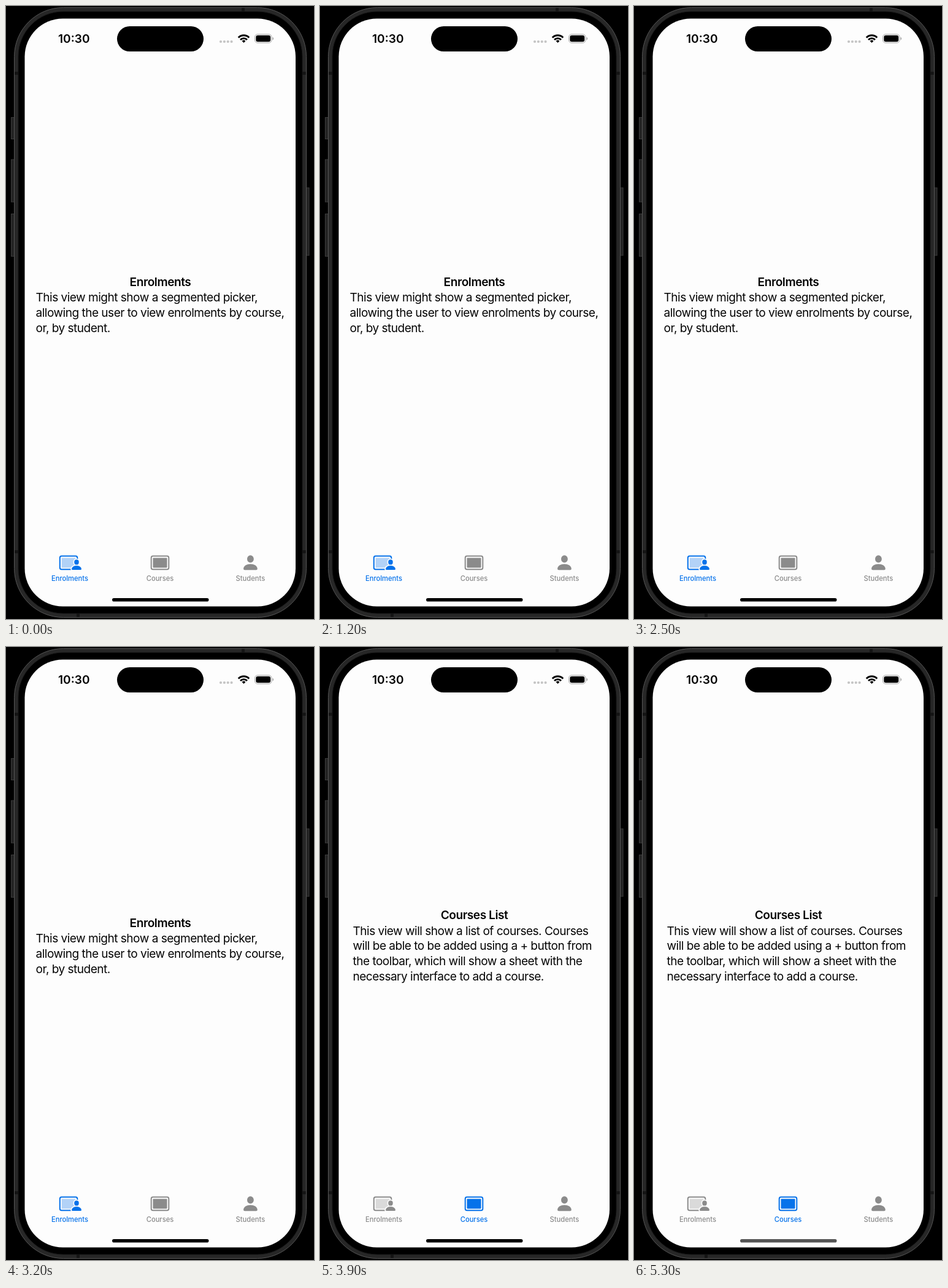
Write an HTML page that moves like this. It is 502 by 998 pixels and loops after 8 s.

```html
<!DOCTYPE html>
<html lang="en">
<head>
<meta charset="utf-8">
<title>Tab bar</title>
<style>
  html, body { margin: 0; width: 100%; height: 100%; overflow: hidden; background: #000; }
  svg { display: block; width: 100%; height: 100%; }
  text { font-family: Inter, sans-serif; }
  .title, .copy { font-size: 19.1px; fill: #050505; letter-spacing: -.53px; }
  .title { font-weight: 600; text-anchor: middle; letter-spacing: -.45px; }
  .clock { font-size: 19.1px; font-weight: 600; }
  .tab { color: #8b8b8b; }
  .tab.on { color: #0672ea; }
  .tab text { font-size: 11.2px; font-weight: 500; text-anchor: middle; fill: currentColor; }
  .fill { fill: currentColor; }
  .line { fill: none; stroke: currentColor; stroke-width: 2; }
</style>
</head>
<body>
<svg viewBox="0 0 502 998">
  <!-- Phone body -->
  <g fill="#232323" stroke="#3b3b3b">
    <rect x="8.5" y="181.500" width="6" height="35"/>
    <rect x="8.5" y="250" width="6" height="69"/>
    <rect x="8.5" y="338.500" width="6" height="69"/>
    <rect x="488" y="296" width="6" height="110"/>
  </g>
  <rect x="13.500" y="2.500" width="476" height="993" rx="80" fill="#272727" stroke="#555"/>
  <path d="M14 109.500h6M14 888.500h6M483 109.500h6M483 888.500h6M386.500 3v6M117.500 989v6" stroke="#151515" stroke-width="5"/>
  <rect x="20" y="9" width="463" height="980" rx="73" fill="#000" stroke="#171717"/>
  <rect x="30.500" y="20.500" width="441.500" height="957" rx="62" fill="#fdfdfd"/>

  <!-- Status bar -->
  <text class="clock" x="85" y="60">10:30</text>
  <rect x="181" y="33" width="141" height="41" rx="20.500"/>
  <path d="M350 58h.01m5.850 0h.01m5.850 0h.01m5.850 0h.01" stroke="#c4c4c4" stroke-width="4.200" stroke-linecap="round"/>
  <g fill="none" stroke="#000" stroke-width="2.900">
    <path d="M378.800 51.400a12.300 12.300 0 0 1 17.400 0M382 54.900a7.700 7.700 0 0 1 11 0"/>
    <path d="M387.500 60l-2.900-3a4.100 4.100 0 0 1 5.800 0z" fill="#000" stroke="none"/>
  </g>
  <rect x="405.500" y="46" width="27.500" height="14" rx="4.600" fill="none" stroke="#a5a5a5"/>
  <rect x="407.300" y="47.800" width="23.900" height="10.400" rx="3"/>
  <path d="M434.500 50.800a2.400 2.400 0 0 1 0 4.600z" fill="#a5a5a5"/>

  <!-- Pages -->
  <g class="page">
    <text class="title" x="251.500" y="455.700">Enrolments</text>
    <text class="copy">
      <tspan x="48.500" y="481">This view might show a segmented picker,</tspan>
      <tspan x="48.500" y="505.700">allowing the user to view enrolments by course,</tspan>
      <tspan x="48.500" y="530.500">or, by student.</tspan>
    </text>
  </g>
  <g class="page">
    <text class="title" x="251.500" y="443.300">Courses List</text>
    <text class="copy">
      <tspan x="53.500" y="468.500">This view will show a list of courses. Courses</tspan>
      <tspan x="53.500" y="493.300">will be able to be added using a + button from</tspan>
      <tspan x="53.500" y="518">the toolbar, which will show a sheet with the</tspan>
      <tspan x="53.500" y="542.800">necessary interface to add a course.</tspan>
    </text>
  </g>

  <!-- Tab bar -->
  <defs>
    <g id="person">
      <ellipse cy="-7.300" rx="5.400" ry="6"/>
      <path d="M-11.300 8.800C-11.300 4-6 1.100 0 1.100S11.300 4 11.300 8.800Q11.300 10.700 9.300 10.700H-9.300Q-11.300 10.700-11.300 8.800z"/>
    </g>
  </defs>
  <g class="tab">
    <rect class="line" x="87.800" y="895.600" width="28.500" height="21.600" rx="2.800"/>
    <rect class="fill" x="90.600" y="898.400" width="23" height="16" rx=".8" opacity=".3"/>
    <use href="#person" transform="translate(115 910.500) scale(.7)" fill="#fdfdfd" stroke="#fdfdfd" stroke-width="5"/>
    <use href="#person" transform="translate(115 910.500) scale(.7)" class="fill"/>
    <text x="104" y="936">Enrolments</text>
  </g>
  <g class="tab">
    <rect class="line" x="236.700" y="895.600" width="28.600" height="21.600" rx="2.800"/>
    <rect class="fill" x="239.500" y="898.400" width="23" height="16" rx=".8"/>
    <text x="251" y="936">Courses</text>
  </g>
  <g class="tab">
    <use href="#person" transform="translate(398.400 907.500)" class="fill"/>
    <text x="398.400" y="936">Students</text>
  </g>
  <rect id="home" x="173" y="964" width="157.500" height="5.600" rx="2.800"/>
  <circle id="touch" cx="247.800" cy="914" r="18.500" fill="#bababa"/>
</svg>
<script>
  const LOOP = 8000, PRESS = 3400, SWITCH = 3900;
  const pages = document.querySelectorAll('.page');
  const tabs = document.querySelectorAll('.tab');
  const home = document.getElementById('home');
  const touch = document.getElementById('touch');
  const ramp = (t, start, length) => Math.min(1, Math.max(0, (t - start) / length));

  function draw(now) {
    const t = now % LOOP;
    const selected = t < SWITCH ? 0 : 1;
    pages.forEach((page, i) => page.style.display = i === selected ? '' : 'none');
    tabs.forEach((tab, i) => tab.classList.toggle('on', i === selected));
    const grey = Math.round(85 * ramp(t, SWITCH, 400));
    home.setAttribute('fill', `rgb(${grey},${grey},${grey})`);
    const held = t >= PRESS && t < SWITCH;
    touch.setAttribute('opacity', held ? .4 + .35 * ramp(t, PRESS, 100) : 0);
  }

  function tick() {
    draw(performance.now());
    requestAnimationFrame(tick);
  }
  tick();
</script>
</body>
</html>
```
